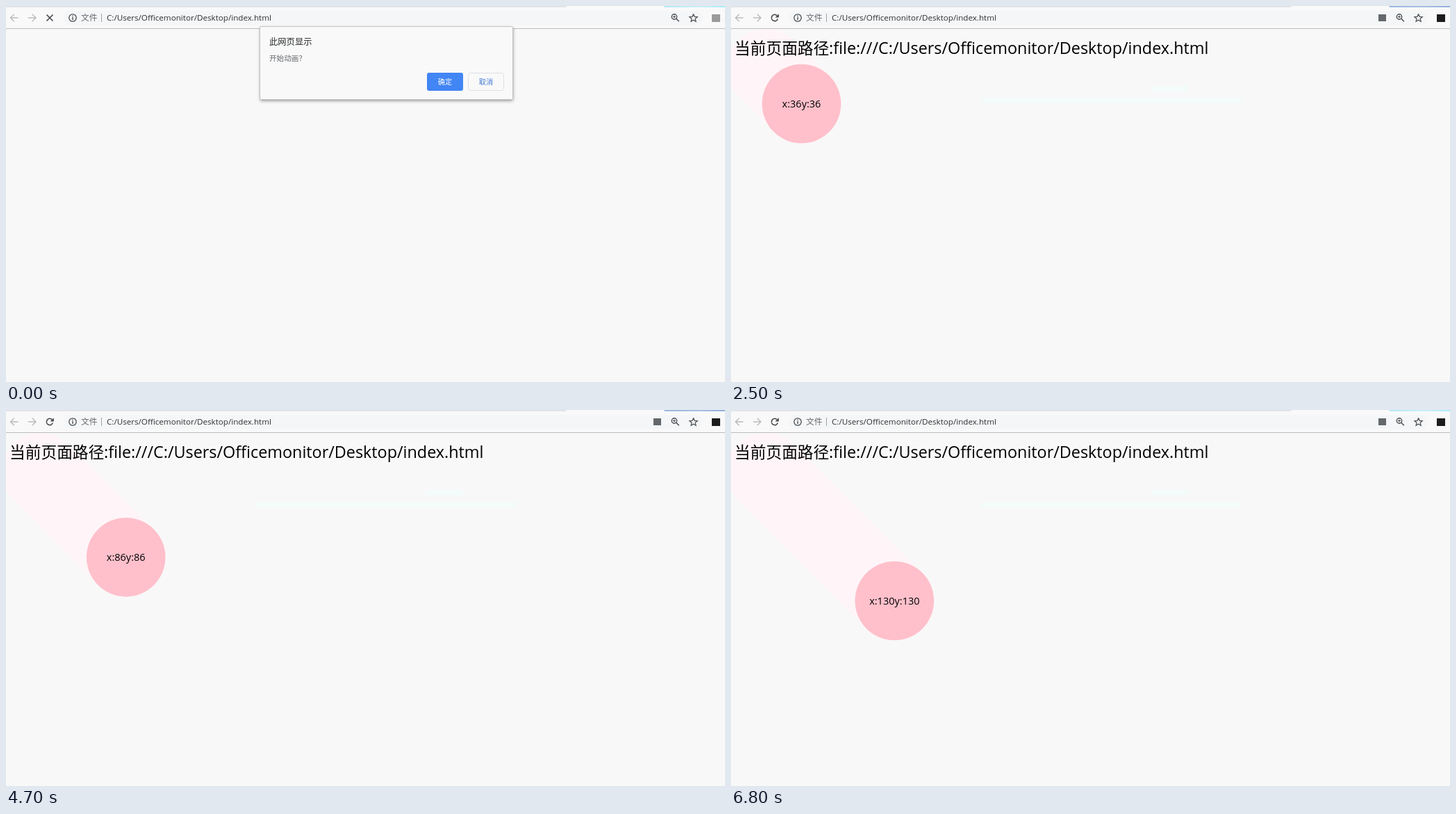
Animation, 1035 px wide and 541 px high, one loop 6900 ms. Source, as an HTML page with a canvas:

```html
<!DOCTYPE html>
<html lang="zh-CN">
<head>
<meta charset="utf-8">
<title>index.html</title>
<style>
html, body { margin: 0; width: 100%; height: 100%; overflow: hidden; background: #f8f8f8; }
canvas { display: block; }
</style>
</head>
<body>
<canvas id="stage" width="1035" height="541"></canvas>
<script>
const ctx = document.getElementById('stage').getContext('2d');
const LOOP = 6900, STEP = 100;
const LATIN = '"Open Sans", "Noto Sans", sans-serif';
const CJK = '"Noto Sans CJK SC", "Noto Sans CJK", sans-serif';
const PATH = 'C:/Users/Officemonitor/Desktop/index.html';

const PRESS = 400, CLOSE = 600, LOADED = 700, START = 800, TAB_BACK = 6500;
const SKIPS = [1600, 2800, 3900, 4700, 5700]; // moments when the timer ticks twice
const ZOOM = 1.4236, RADIUS = 56.8;

function text(str, x, y, size, color, font = CJK, weight = 400, align = 'left') {
  ctx.font = `${weight} ${size}px ${font}`;
  ctx.fillStyle = color;
  ctx.textAlign = align;
  ctx.fillText(str, x, y);
}

function rect(x, y, w, h, color) {
  ctx.fillStyle = color;
  ctx.fillRect(x, y, w, h);
}

function box(x, y, w, h, r, fill, stroke) {
  ctx.beginPath();
  ctx.roundRect(x, y, w, h, r);
  if (fill) { ctx.fillStyle = fill; ctx.fill(); }
  if (stroke) { ctx.strokeStyle = stroke; ctx.lineWidth = 1; ctx.stroke(); }
}

function line(color, width, ...paths) {
  ctx.strokeStyle = color;
  ctx.lineWidth = width;
  ctx.beginPath();
  for (const p of paths) {
    ctx.moveTo(p[0], p[1]);
    for (let i = 2; i < p.length; i += 2) ctx.lineTo(p[i], p[i + 1]);
  }
  ctx.stroke();
}

function arc(x, y, r, color, width, from = 0, to = Math.PI * 2) {
  ctx.strokeStyle = color;
  ctx.lineWidth = width;
  ctx.beginPath();
  ctx.arc(x, y, r, from, to);
  ctx.stroke();
}

function star(cx, cy, r) {
  const p = [];
  for (let i = 0; i <= 10; i++) {
    const a = i * Math.PI / 5 - Math.PI / 2, d = i % 2 ? r * 0.45 : r;
    p.push(cx + d * Math.cos(a), cy + d * Math.sin(a));
  }
  line('#4a4d51', 1.2, p);
}

function tabStrip(cyan) {
  box(-5, -4, 812, 5.7, 2, '#dfe1e5');
  const g = ctx.createLinearGradient(947, 0, 1035, 0);
  g.addColorStop(0, cyan ? '#a9e6f7' : '#8fb0de');
  g.addColorStop(0.6, cyan ? '#c6effa' : '#9db9e2');
  g.addColorStop(1, cyan ? '#a0e9fa' : '#86a6d8');
  box(947, -4, 95, 5.7, 2, g);
}

function reloadIcon() {
  arc(63, 17, 4.6, '#45484c', 1.6, 0.35, 5.5);
  ctx.fillStyle = '#45484c';
  ctx.beginPath();
  ctx.moveTo(68.8, 11.2);
  ctx.lineTo(68.8, 16.4);
  ctx.lineTo(63.6, 16.4);
  ctx.fill();
}

function toolbar(t) {
  const loaded = t >= LOADED;
  rect(0, 0, 1035, 32, '#f9f9f9');
  tabStrip(!loaded || t >= TAB_BACK);
  box(82, 7, 921, 20, 10, '#f4f6f7');
  rect(0, 32, 1035, 1, '#bcbcbc');

  line('#b9bbbd', 1.4, [17.5, 17, 6.5, 17], [11.8, 11.7, 6.5, 17, 11.8, 22.3]);
  line('#b9bbbd', 1.4, [32, 17, 43, 17], [37.7, 11.7, 43, 17, 37.7, 22.3]);
  if (loaded) reloadIcon();
  else line('#45484c', 1.6, [58.5, 12.5, 67.5, 21.5], [67.5, 12.5, 58.5, 21.5]);

  arc(96, 17, 5.2, '#4a4d51', 1.3);
  rect(95.3, 16, 1.4, 4, '#4a4d51');
  rect(95.3, 13.7, 1.4, 1.4, '#4a4d51');
  text('文件', 108, 21.3, 11.8, '#66696d');
  rect(137, 11, 1, 12, '#a0a3a6');
  text(PATH, 145, 21, 11.65, '#2f3033', LATIN);

  if (loaded) rect(932, 12, 11, 10, '#64686c');
  arc(962, 15.5, 3.7, '#4a4d51', 1.4);
  line('#4a4d51', 1.6, [964.8, 18.3, 968.8, 22.3]);
  line('#4a4d51', 1, [960, 15.5, 964, 15.5], [962, 13.5, 962, 17.5]);
  star(989.6, 17.5, 6);
  rect(1016, 12, 12, 11, loaded ? '#1c1c1c' : '#9a9a9a');
}

function dialog(t) {
  ctx.save();
  if (t >= CLOSE) ctx.globalAlpha = 0.4;
  ctx.save();
  ctx.shadowColor = 'rgba(0,0,0,.4)';
  ctx.shadowBlur = 4;
  ctx.shadowOffsetY = 1.5;
  box(366, 30, 364, 105, 2, '#f9f9f9');
  ctx.restore();
  box(365.5, 29.5, 364, 105, 2, null, '#c2c2c2');
  text('此网页显示', 379, 55.7, 12.3, '#27292c');
  text('开始动画？', 379, 78.5, 10.6, '#65686c');
  box(606, 96, 52, 26, 3, t >= PRESS ? '#3b78dc' : '#4285f4');
  text('确定', 632, 113, 10.2, '#fff', CJK, 500, 'center');
  box(665.5, 96.5, 51, 25, 3, null, '#dfe1e5');
  text('取消', 691, 113, 10.2, '#4279d4', CJK, 400, 'center');
  ctx.restore();
}

function ball(t) {
  const ticks = Math.floor((t - START) / STEP) + SKIPS.filter(s => s <= t).length;
  const n = ticks * 2;
  const x0 = 50.25, y0 = 89.4;
  return { n, x0, y0, x: x0 + n * ZOOM, y: y0 + n * ZOOM };
}

function page(t) {
  const b = t >= START ? ball(t) : null;
  rect(360, 133, 375, 7, '#f4fbfb');
  rect(606, 115, 52, 8, '#f4fbfb');
  if (b) {
    ctx.lineCap = 'round';
    line('#fff5f9', RADIUS * 2, [b.x0, b.y0, b.x + 0.01, b.y]);
    ctx.lineCap = 'butt';
  }
  text('当前页面路径', 5, 68.5, 22.72, '#000');
  text(':file:///' + PATH, 141, 68.5, 23.36, '#000', LATIN);
  if (b) {
    ctx.fillStyle = '#ffc0cb';
    ctx.beginPath();
    ctx.arc(b.x, b.y, RADIUS, 0, Math.PI * 2);
    ctx.fill();
    text(`x:${b.n}y:${b.n}`, b.x, b.y + 5.5, 14.5, '#000', LATIN, 400, 'center');
  }
}

function draw(ms) {
  const t = Math.floor((ms % LOOP) / STEP) * STEP;
  rect(0, 0, 1035, 541, '#f8f8f8');
  if (t >= LOADED) page(t);
  toolbar(t);
  if (t < LOADED) dialog(t);
}

const begin = performance.now();
function tick() {
  draw(performance.now() - begin);
  requestAnimationFrame(tick);
}
tick();
</script>
</body>
</html>
```
